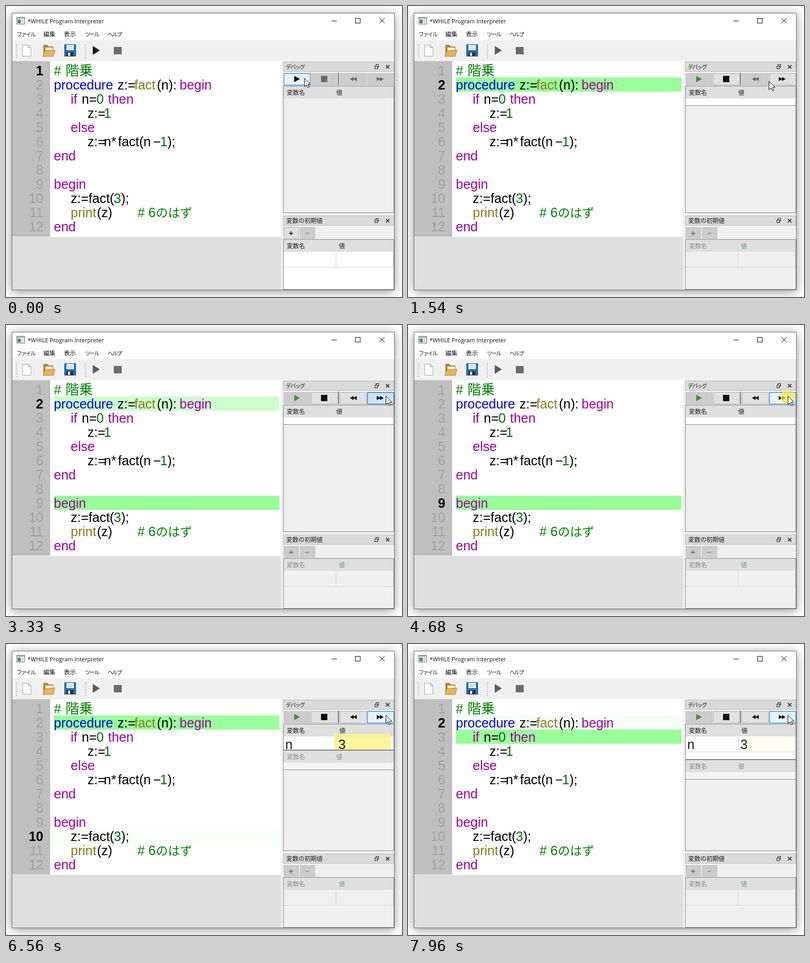
Write an HTML page with a canvas that moves like this. It is 753x554 px and loops after 8 s.

```html
<!DOCTYPE html>
<html lang="ja">
<head>
<meta charset="utf-8">
<title>WHILE Program Interpreter</title>
<style>
html, body { margin: 0; width: 100%; height: 100%; overflow: hidden; background: #fff; }
canvas { display: block; }
</style>
</head>
<body>
<canvas id="stage" width="753" height="554"></canvas>
<script>
const ctx = document.getElementById('stage').getContext('2d');
const LOOP = 8000;
const CODE_FONT = '25px "Liberation Sans", Arial, sans-serif';
const JP = '"Noto Sans CJK JP", "Noto Sans CJK", sans-serif';

const BLACK = '#000', PURPLE = '#a000a0', BLUE = '#0000e6', OLIVE = '#8a7a1c', GREEN = '#008000', NUMBER = '#006c10';
const EDGE = '#828790', FACE = '#f0f0f0', GREY = '#8c8c8c';

// Source lines: runs of [x, colour, text]
const program = [
  [[91, GREEN, '#']],
  [[91, BLUE, 'procedure'], [212, BLACK, 'z:='], [244, OLIVE, 'fact'], [287, BLACK, '(n):'], [330, PURPLE, 'begin']],
  [[123, PURPLE, 'if'], [144, BLACK, 'n='], [172, NUMBER, '0'], [194, PURPLE, 'then']],
  [[155, BLACK, 'z:='], [186, NUMBER, '1']],
  [[123, PURPLE, 'else']],
  [[155, BLACK, 'z:='], [186, BLACK, 'n*'], [213, BLACK, 'fact(n'], [280, BLACK, '−'], [293, NUMBER, '1'], [307, BLACK, ');']],
  [[91, PURPLE, 'end']],
  [],
  [[91, PURPLE, 'begin']],
  [[123, BLACK, 'z:=fact('], [205, NUMBER, '3'], [219, BLACK, ');']],
  [[123, OLIVE, 'print'], [173, BLACK, '(z)'], [250, GREEN, '# 6']],
  [[91, PURPLE, 'end']],
];

// Each click advances the interpreter to a row
const steps = [
  { at: -9999, row: 1 }, { at: 60, row: 2 }, { at: 3200, row: 9 },
  { at: 4680, row: 10 }, { at: 6160, row: 2 }, { at: 7620, row: 3 },
];
const CALL = 6160, RETURN_TO_WHITE = 7620;

const pointerPath = [
  [930, 567, 137], [1540, 686, 143], [1670, 692, 139], [2140, 721, 135], [2340, 721, 135], [2341, 722, 135],
];

const clamp = v => Math.max(0, Math.min(1, v));
const fade = dt => dt < 40 ? 1 : dt > 600 ? 0 : 2 ** (-(dt - 40) / 90);
const rowTop = row => 82 + 27 * row;

function rect(x, y, w, h, color) {
  ctx.fillStyle = color;
  ctx.fillRect(x, y, w, h);
}

function box(x, y, w, h, fill, border) {
  rect(x, y, w, h, border);
  rect(x + 1, y + 1, w - 2, h - 2, fill);
}

function text(str, x, y, color, font, spacing = 0, align = 'left') {
  ctx.font = font;
  ctx.letterSpacing = spacing + 'px';
  ctx.textAlign = align;
  ctx.fillStyle = color;
  ctx.fillText(str, x, y);
}

const kanji = (str, x, y, color = '#1a1a1a') => text(str, x, y, color, '11.5px ' + JP);
const kana = (str, x, y) => text(str, x, y, '#1a1a1a', '10.5px ' + JP, -1.7);

function polygon(points, fill, stroke) {
  ctx.beginPath();
  for (let i = 0; i < points.length; i += 2) ctx.lineTo(points[i], points[i + 1]);
  ctx.closePath();
  if (fill) { ctx.fillStyle = fill; ctx.fill(); }
  if (stroke) { ctx.strokeStyle = stroke; ctx.lineWidth = 1; ctx.stroke(); }
}

function cross(x, y, size, color, width) {
  ctx.beginPath();
  ctx.moveTo(x, y); ctx.lineTo(x + size, y + size);
  ctx.moveTo(x + size, y); ctx.lineTo(x, y + size);
  ctx.strokeStyle = color;
  ctx.lineWidth = width;
  ctx.stroke();
}

function drawWindow() {
  rect(0, 0, 753, 554, '#fff');
  ctx.save();
  ctx.shadowColor = 'rgba(0,0,0,.42)';
  ctx.shadowBlur = 18;
  ctx.shadowOffsetY = 3;
  rect(11, 13, 728, 528, '#6e6e6e');
  ctx.restore();
  rect(12, 14, 726, 51, '#fff');
  rect(12, 65, 726, 475, FACE);

  box(20, 21, 16, 14, '#fafafa', '#6f6f6f');
  rect(21, 22, 14, 3, '#b8c0c8');
  rect(22, 26, 6, 7, '#3f8f62');
  rect(29, 26, 5, 7, '#d8d8d8');
  text('*WHILE Program Interpreter', 41, 33, '#111', '11px "Open Sans", sans-serif');
  rect(619, 28, 10, 1, '#111');
  box(664, 23, 10, 10, '#fff', '#111');
  cross(710, 23, 10, '#111', 1);

  kana('ファイル', 20, 58);
  kanji('編集', 71, 58);
  kanji('表示', 110, 58);
  kana('ツール', 150, 58);
  kana('ヘルプ', 193, 58);
}

function drawToolbar(running) {
  for (const x of [19, 150])
    for (let y = 73; y < 99; y += 4) rect(x, y, 2, 2, '#bdbdbd');

  polygon([31.5, 74.5, 42.5, 74.5, 47.5, 79.5, 47.5, 95.5, 31.5, 95.5], '#fdfdfd', '#a8a8a8');
  polygon([42.5, 74.5, 42.5, 79.5, 47.5, 79.5], '#ddd', '#a8a8a8');

  polygon([71, 74, 79, 74, 81, 77, 90, 77, 90, 95, 71, 95], '#b8832f');
  rect(75, 79, 14, 8, '#f4efe2');
  polygon([70, 96, 74, 85, 93, 84, 90, 96], '#e6b45b', '#bd8530');

  box(111, 73, 22, 23, '#2474b8', '#174c7c');
  rect(115, 74, 14, 10, '#f2f6fa');
  rect(117, 77, 10, 1, '#aab8c5');
  rect(117, 80, 10, 1, '#aab8c5');
  rect(115, 88, 13, 8, '#26323d');
  rect(118, 89, 4, 6, '#e8eef3');

  polygon([165, 76, 178.5, 84.5, 165, 93], running ? '#5c5c5c' : '#181818');
  rect(205, 78, 15, 14, '#6c6c6c');
}

function drawEditor(t, current) {
  rect(12, 105, 511, 334, '#fff');
  rect(12, 105, 72, 334, '#bfbfbf');
  rect(12, 440, 511, 100, '#dfdfdf');

  const step = steps[current], dt = t - step.at;
  if (current > 1) {
    ctx.globalAlpha = fade(dt);
    rect(91, rowTop(steps[current - 1].row), 429, 27, '#99ff99');
    ctx.globalAlpha = 1;
  }
  if (current > 0 && dt >= 60) rect(91, rowTop(step.row), 429, 27, '#99ff99');

  const marked = dt >= 500 ? step.row : steps[current - 1].row;
  program.forEach((line, i) => {
    const row = i + 1, y = rowTop(row) + 23, active = row === marked;
    text(row, 71, y, active ? BLACK : '#a0a0a4', (active ? 'bold ' : '') + CODE_FONT, 0, 'right');
    for (const [x, color, str] of line) text(str, x, y, color, CODE_FONT);
  });
  text('階乗', 113, 132, GREEN, '26px ' + JP);
  text('のはず', 285, 402, GREEN, '23px ' + JP);
}

function drawDockTitle(y) {
  box(527, y, 211, 19, '#dadada', '#bcbcbc');
  box(703, y + 5, 6, 6, '#dadada', '#222');
  box(701, y + 8, 6, 6, '#dadada', '#222');
  cross(722.5, y + 6.5, 6.5, '#222', 1.6);
}

const icons = {
  play: c => polygon([548, 133, 559, 139, 548, 145], c),
  stop: c => rect(599, 133, 12, 12, c),
  back(c) {
    polygon([654, 139, 661, 135, 661, 143], c);
    polygon([660, 139, 667, 135, 667, 143], c);
  },
  forward(c) {
    polygon([705, 135, 712, 139, 705, 143], c);
    polygon([711, 135, 718, 139, 711, 143], c);
  },
};

function drawButton(name, x, enabled, hover, pressed, disabledColor = '#6a6a6a') {
  const [fill, border] = !enabled ? ['#cccccc', '#bfbfbf']
    : pressed ? ['#cce4f7', '#005499']
    : hover ? ['#e5f3fb', '#0078d7'] : ['#e1e1e1', '#adadad'];
  box(x, 128, 51, 23, fill, border);
  icons[name](enabled ? '#111' : disabledColor);
}

function drawHeader(y, valueX, color, valueColor = color) {
  rect(528, y, 209, 23, '#dfdfdf');
  kanji('変数名', 534, y + 16, color);
  kanji('値', valueX, y + 16, valueColor);
}

// A stack frame with no variables yet
function drawEmptyFrame(y, active) {
  box(527, y, 211, 38, active ? '#fff' : '#f4f4f4', EDGE);
  drawHeader(y + 1, 628, active ? '#1a1a1a' : GREY);
}

function drawCallFrame(height, t) {
  ctx.save();
  ctx.beginPath();
  ctx.rect(527, 152, 211, height);
  ctx.clip();
  box(527, 152, 211, height, '#fff', EDGE);
  drawHeader(153, 634, '#1a1a1a');
  rect(628, 177, 1, 28, '#d4d4d4');
  rect(528, 205, 209, 1, '#d4d4d4');

  const spread = 1 - clamp((t - CALL - 230) / 350);
  ctx.globalAlpha = (t < RETURN_TO_WHITE ? 1 : fade(t - RETURN_TO_WHITE)) * 0.85;
  rect(629 - 10 * spread, 177 - 12 * spread, 108, 28 + 24 * spread, '#fbf58c');
  ctx.globalAlpha = 1;
  text('n', 531, 200, '#1c1c1c', CODE_FONT);
  text('3', 632, 200, '#1c1c1c', CODE_FONT);
  rect(527, 151 + height, 211, 1, EDGE);
  ctx.restore();
}

function drawDebugDock(t, pointer, running, dt) {
  drawDockTitle(106);
  kana('デバッグ', 532, 120);

  const over = x => pointer.x >= x && pointer.x < x + 51;
  const pressed = dt >= 60 && dt < 190;
  drawButton('play', 528, !running, over(528), pressed, '#4c8a3c');
  drawButton('stop', 580, running, over(580), false);
  rect(632, 127, 1, 24, '#111');
  drawButton('back', 635, t >= 3260, false, false);
  drawButton('forward', 687, running, over(687), pressed && t > 3000);

  box(527, 152, 211, 242, '#efefef', EDGE);
  const p = clamp((t - CALL - 230) / 350);
  const height = Math.round(68 * (1 - (1 - p) ** 2));
  if (!running) drawHeader(153, 628, '#1a1a1a');
  else drawEmptyFrame(152 + height, height === 0);
  if (height > 2) drawCallFrame(height, t);
}

function drawInitialValues(running) {
  drawDockTitle(399);
  kanji('変数の初期値', 533, 413);
  const face = ['#cccccc', '#bfbfbf'];
  box(528, 421, 29, 22, ...(running ? face : ['#e1e1e1', '#adadad']));
  box(559, 421, 29, 22, ...face);
  const plus = running ? '#666' : '#111';
  rect(538, 432, 8, 1.5, plus);
  rect(541.3, 428.5, 1.5, 8, plus);
  rect(569, 432, 8, 1.5, '#888');

  box(527, 444, 211, 96, running ? FACE : '#fff', EDGE);
  drawHeader(445, 633, running ? GREY : '#1a1a1a', running ? '#6a9494' : '#1a1a1a');
  rect(627, 468, 1, 29, '#d4d4d4');
  rect(528, 497, 209, 1, '#d4d4d4');
  rect(736, 468, 1, 29, '#d4d4d4');
}

function pointerAt(t) {
  const next = pointerPath.findIndex(k => k[0] > t);
  if (next === 0) return { x: 567, y: 137 };
  if (next < 0) return { x: 722, y: 135 };
  const [t0, x0, y0] = pointerPath[next - 1], [t1, x1, y1] = pointerPath[next];
  const p = (t - t0) / (t1 - t0);
  return { x: Math.round(x0 + (x1 - x0) * p), y: Math.round(y0 + (y1 - y0) * p) };
}

function drawPointer({ x, y }, clicking) {
  if (clicking) {
    ctx.beginPath();
    ctx.arc(x, y + 2, 13.5, 0, 7);
    ctx.fillStyle = 'rgba(250,232,70,.72)';
    ctx.fill();
  }
  ctx.save();
  ctx.translate(x + 0.5, y + 0.5);
  polygon([0, 0, 0, 16, 4, 12.5, 6.5, 18, 9, 17, 6.5, 11.5, 11.5, 11.5], '#fff', '#111');
  ctx.restore();
}

function draw(t) {
  const current = steps.findLastIndex(s => s.at <= t);
  const dt = t - steps[current].at;
  const running = t >= 160;
  const pointer = pointerAt(t);
  drawWindow();
  drawToolbar(running);
  drawEditor(t, Math.max(current, 0));
  drawDebugDock(t, pointer, running, dt);
  drawInitialValues(running);
  drawPointer(pointer, current > 0 && dt < 100);
}

const start = performance.now();
function tick() {
  draw((performance.now() - start) % LOOP);
  requestAnimationFrame(tick);
}
tick();
</script>
</body>
</html>
```
